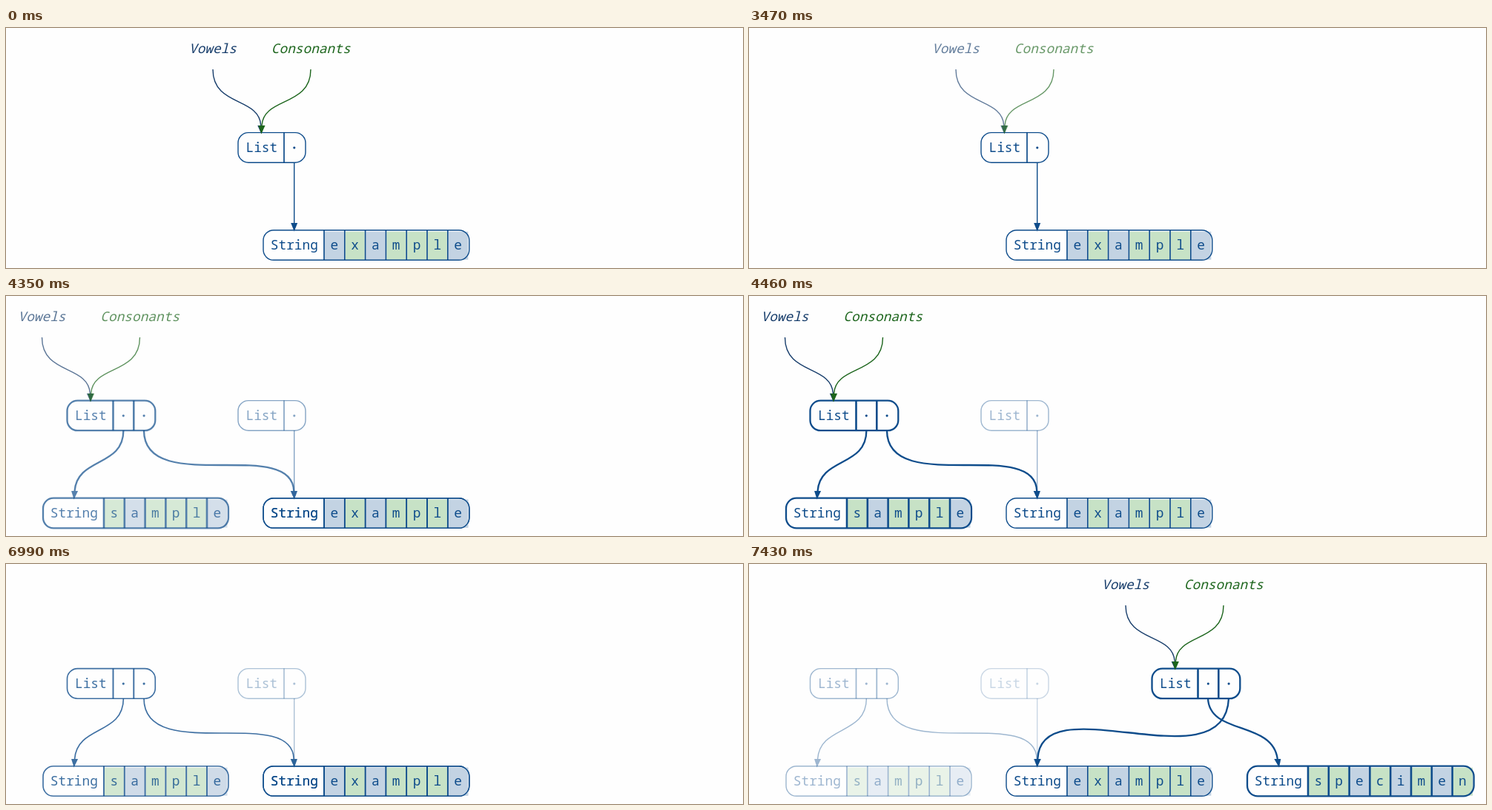
Animation of 994 by 325 pixels, one loop 8 s. Source, as an HTML page with a canvas:

```html
<!DOCTYPE html>
<html lang="en">
<head>
<meta charset="utf-8">
<style>
html, body { margin: 0; width: 100%; height: 100%; overflow: hidden; background: #fefefe; }
canvas { display: block; }
</style>
</head>
<body>
<canvas id="stage" width="994" height="325"></canvas>
<script>
const ctx = document.getElementById('stage').getContext('2d');
const LOOP = 8000, STEP = 110, CELL = 27.8, THIN = 1.4, THICK = 2.3;
const BLUE = '#0e4c8b', NAVY = '#173d6b', GREEN = '#1c651c';
const VOWEL_FILL = '#c3d3e3', CONSONANT_FILL = '#c7e2c6';
const FONT = '17.8px "Noto Sans Mono", "DejaVu Sans Mono", monospace';

const clamp = v => Math.min(1, Math.max(0, v));
const mix = (a, b, k) => a + (b - a) * k;

function text(str, x, baseline, color, style = '') {
  ctx.font = style + FONT;
  ctx.fillStyle = color;
  ctx.fillText(str, x, baseline);
}

// Curve through four points, ended by an arrowhead whose point is at tip.
function edge(x0, y0, x1, y1, x2, y2, x3, y3, tipX, color, width) {
  ctx.strokeStyle = ctx.fillStyle = color;
  ctx.lineWidth = width;
  ctx.beginPath();
  ctx.moveTo(x0, y0);
  ctx.bezierCurveTo(x1, y1, x2, y2, x3, y3);
  ctx.stroke();
  ctx.beginPath();
  ctx.moveTo(x3 - 4.5, y3);
  ctx.lineTo(x3 + 4.5, y3);
  ctx.lineTo(tipX, y3 + 11.5);
  ctx.fill();
}

// Rounded record: a titled head followed by equal cells.
function record(x, y, title, head, cells, width) {
  const w = head + cells.length * CELL + 1.2;
  [...cells].forEach((c, i) => {
    if (c === '·') return;
    const last = i === cells.length - 1;
    ctx.fillStyle = 'aeiou'.includes(c) ? VOWEL_FILL : CONSONANT_FILL;
    ctx.fillRect(x + head + i * CELL + 1, y + 2, CELL - (last ? 1.3 : 2), 38);
  });
  ctx.strokeStyle = BLUE;
  ctx.lineWidth = width;
  ctx.beginPath();
  ctx.roundRect(x, y, w, 40.6, 14);
  ctx.stroke();
  text(title, x + head / 2 + .8, y + 26.3, BLUE);
  [...cells].forEach((c, i) => {
    const left = x + head + i * CELL;
    ctx.lineWidth = width + .3;
    ctx.beginPath();
    ctx.moveTo(left, y);
    ctx.lineTo(left, y + 40.6);
    ctx.stroke();
    if (c === '·') {
      ctx.beginPath();
      ctx.arc(left + 13.8, y + 20.5, 1.6, 0, 7);
      ctx.fillStyle = BLUE;
      ctx.fill();
    } else text(c, left + 13.8, y + 26.3, BLUE);
  });
}

const list = (x, cells, width) => record(x, 141.6, 'List', 62, cells, width);
const string = (x, word, width) => record(x, 273.7, 'String', 82, word, width);

function labels(x, tip) {
  text('Vowels', x, 34.4, NAVY, 'italic ');
  text('Consonants', x + 132.2, 34.4, GREEN, 'italic ');
  edge(x, 56, x, 107, tip - 3, 93, tip - .6, 132, tip, NAVY, THIN);
  edge(x + 132, 56, x + 132, 107, tip + 3, 93, tip + .6, 132, tip, GREEN, THIN);
}

const versions = [
  {
    label: [279, 344.4],
    draw(width) {
      list(313, '·', width);
      edge(388.7, 182, 388.7, 210, 388.7, 240, 388.7, 264, 388.7, BLUE, width);
    }
  },
  {
    label: [48.5, 114],
    draw(width) {
      list(82.5, '··', width);
      string(50, 'sample', width);
      edge(158.4, 182, 158.4, 232, 96, 218, 92.6, 264, 91.6, BLUE, width);
      edge(186, 182, 186, 272, 386, 190, 388.2, 264, 388.9, BLUE, width);
    }
  },
  {
    label: [508, 574.8],
    draw(width) {
      list(543.5, '··', width);
      string(672, 'specimen', width);
      edge(619, 182, 621, 232, 706, 212, 712.8, 264, 715, BLUE, width);
      edge(647, 182, 642, 300, 394, 162, 389.3, 264, 388.6, BLUE, width);
    }
  }
];

const AGED = [1, .4, .22];
const changes = [3470, 6440];

function render(t) {
  const steps = changes.map(start =>
    Math.min(10, Math.max(0, Math.floor((t - start) / STEP) + 1)));
  const fadeOut = steps.map(s => clamp((s - 4) / 6));
  const fadeIn = steps.map(s => s < 7 ? 0 : clamp(.1 + .3 * (s - 7)));
  const crossing = steps.some(s => s >= 4 && s < 10);

  ctx.globalAlpha = 1;
  ctx.fillStyle = '#fefefe';
  ctx.fillRect(0, 0, 994, 325);
  ctx.textAlign = 'center';

  string(347, 'example', THIN);
  if (crossing) string(347, 'example', THIN);

  versions.forEach((v, i) => {
    const shown = i ? fadeIn[i - 1] : 1;
    if (!shown) return;
    let alpha = shown;
    for (let k = i; k < steps.length; k++)
      alpha *= mix(1, AGED[k - i + 1] / AGED[k - i], fadeOut[k]);
    const left = steps[i] ? clamp((steps[i] - 3) / 4) : 0;
    ctx.globalAlpha = alpha;
    v.draw(i ? mix(THICK, THIN, left) : THIN);

    const labelAlpha = shown * clamp(1 - (steps[i] || 0) / 3);
    if (labelAlpha > 0) {
      ctx.globalAlpha = labelAlpha;
      labels(...v.label);
    }
  });
}

const begin = performance.now();
function tick() {
  render((performance.now() - begin) % LOOP);
  requestAnimationFrame(tick);
}
tick();
</script>
</body>
</html>
```
